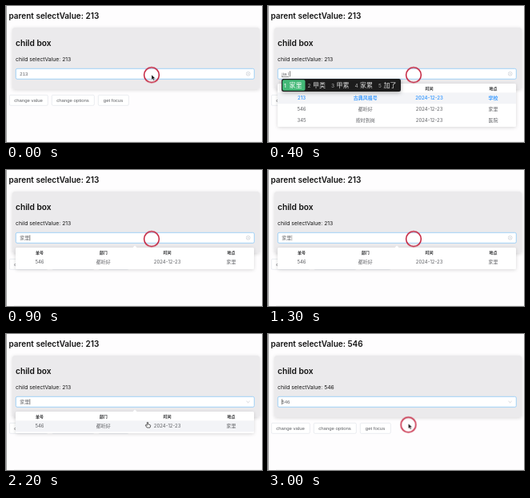
Recreate the animation shown at these times as an HTML page. Size 320 by 170 pixels, loop 3.2 s.

```html
<!DOCTYPE html>
<html lang="en">
<head>
<meta charset="utf-8">
<title>Select demo</title>
<style>
html, body { margin: 0; width: 100%; height: 100%; overflow: hidden; background: #fefdfe; }
svg { display: block; width: 100vw; height: 100vh; }
text { font-family: Inter, "Noto Sans CJK SC", "Noto Sans CJK", sans-serif; font-size: 6px; fill: #606266; }
.title { font-size: 10px; font-weight: 600; fill: #111; }
.subtitle { font-size: 10.2px; }
.label { font-size: 6.8px; fill: #151515; }
.ui { font-family: "Liberation Sans", Arial, "Noto Sans CJK SC", "Noto Sans CJK", sans-serif; }
.button rect { fill: #fff; stroke: #dcdfe6; stroke-width: .6; }
.button text, .cells text { text-anchor: middle; }
.head text { font-size: 5px; font-weight: 700; fill: #303133; }
.picked text { font-weight: 600; fill: #409eff; }
.ime text { font-size: 8px; fill: #ddd; }
.ime .key { font-size: 6.5px; fill: #aaa; }
.ime .first { fill: #fff; font-weight: 500; }

/* one loop is 32 steps of 100 ms */
.anim { animation: 3.2s step-end infinite; }
.before { animation-name: before; }
.after { animation-name: after; }
.untouched { animation-name: untouched; }
.typed1 { animation-name: typed1; }
.typed2 { animation-name: typed2; }
.typed3 { animation-name: typed3; }
.ime2 { animation-name: ime2; }
.committed { animation-name: committed; }
.all-rows { animation-name: allRows; }
.match { animation-name: match; }
.menu { animation-name: menu; transform-origin: 161px 94px; }
.caret { animation-name: caret; }
.clear { animation-name: clear; }
.chevron { animation-name: chevron; }
.hover { animation-name: hover; }
.arrow { animation-name: arrow; }
.hand { animation-name: hand; }
.ring { animation-name: ring; }

@keyframes before { 0% { opacity: 1 } 87.5%, 100% { opacity: 0 } }
@keyframes after { 0% { opacity: 0 } 87.5%, 100% { opacity: 1 } }
@keyframes untouched { 0% { opacity: 1 } 3.125%, 100% { opacity: 0 } }
@keyframes typed1 { 0% { opacity: 0 } 3.125% { opacity: 1 } 12.5%, 100% { opacity: 0 } }
@keyframes typed2 { 0% { opacity: 0 } 12.5% { opacity: 1 } 15.625%, 100% { opacity: 0 } }
@keyframes typed3 { 0% { opacity: 0 } 15.625% { opacity: 1 } 25%, 100% { opacity: 0 } }
@keyframes ime2 { 0% { opacity: 0 } 12.5% { opacity: 1 } 25%, 100% { opacity: 0 } }
@keyframes committed { 0% { opacity: 0 } 25% { opacity: 1 } 87.5%, 100% { opacity: 0 } }
@keyframes allRows { 0% { opacity: 1 } 25%, 100% { opacity: 0 } }
@keyframes match { 0% { opacity: 0 } 25%, 100% { opacity: 1 } }
@keyframes menu {
  0% { opacity: 0; transform: scaleY(0) }
  3.125% { opacity: .3; transform: scaleY(.35) }
  6.25% { opacity: .78; transform: scaleY(.82) }
  9.375% { opacity: 1; transform: scaleY(1) }
  87.5% { opacity: .7; transform: scaleY(.8) }
  90.625% { opacity: .2; transform: scaleY(.35) }
  93.75%, 100% { opacity: 0; transform: scaleY(0) }
}
@keyframes caret {
  0% { opacity: 0; transform: translateX(24px) }
  3.125% { opacity: 1; transform: translateX(23.5px) }
  12.5% { opacity: 1; transform: translateX(26.5px) }
  15.625% { opacity: 1; transform: translateX(28px) }
  25% { opacity: 1; transform: translateX(29.3px) }
  40.625% { opacity: .5; transform: translateX(29.3px) }
  43.75% { opacity: 0; transform: translateX(29.3px) }
  59.375% { opacity: 1; transform: translateX(29.3px) }
  75% { opacity: 0; transform: translateX(29.3px) }
  87.5%, 100% { opacity: 1; transform: translateX(17px) }
}
@keyframes clear { 0% { opacity: 1 } 62.5%, 100% { opacity: 0 } }
@keyframes chevron { 0% { opacity: 0 } 62.5%, 100% { opacity: 1 } }
@keyframes hover { 0% { opacity: 0 } 68.75%, 100% { opacity: 1 } }
@keyframes arrow {
  0% { opacity: 1; transform: translate(182px, 86px) }
  3.125% { opacity: 0; transform: translate(182px, 86px) }
  59.375% { opacity: 1; transform: translate(182px, 89px) }
  62.5% { opacity: 1; transform: translate(181px, 96px) }
  65.625% { opacity: 1; transform: translate(179px, 105px) }
  68.75% { opacity: 0; transform: translate(177px, 111px) }
  93.75%, 100% { opacity: 1; transform: translate(175.5px, 112px) }
}
@keyframes hand {
  0% { opacity: 0; transform: translate(177px, 111px) }
  68.75% { opacity: 1; transform: translate(177px, 110px) }
  71.875% { opacity: 1; transform: translate(176.5px, 112px) }
  75% { opacity: 1; transform: translate(176px, 112.5px) }
  93.75%, 100% { opacity: 0; transform: translate(176px, 112.5px) }
}
@keyframes ring {
  0% { opacity: 1; transform: translate(182px, 86.2px) }
  59.375% { opacity: 0; transform: translate(182px, 86.2px) }
  84.375%, 100% { opacity: 1; transform: translate(175.5px, 113.5px) }
}
</style>
</head>
<body>
<svg viewBox="0 0 320 170">
  <defs>
    <filter id="soft" x="-10%" y="-30%" width="120%" height="160%">
      <feDropShadow dx="0" dy="1" stdDeviation="2.2" flood-color="#000" flood-opacity=".15"/>
    </filter>
    <filter id="deep" x="-10%" y="-60%" width="120%" height="220%">
      <feDropShadow dx="0" dy="1.5" stdDeviation="2.5" flood-color="#000" flood-opacity=".3"/>
    </filter>
  </defs>
  <rect width=".7" height="170" fill="#777"/>
  <rect x="10" y="169" width="310" height="1" fill="#f3f3f3"/>

  <text class="title anim before" x="3.5" y="15.5">parent selectValue: 213</text>
  <text class="title anim after" x="3.5" y="15.5">parent selectValue: 546</text>

  <rect x="8" y="27" width="309" height="77" rx="2.5" fill="#ebeaec" filter="url(#soft)"/>
  <text class="title subtitle" x="12" y="50">child box</text>
  <text class="label anim before" x="12" y="69.3">child selectValue: 213</text>
  <text class="label anim after" x="12" y="69.3">child selectValue: 546</text>

  <g id="buttons"></g>

  <rect x="12.3" y="78.3" width="298" height="13" rx="1.7" fill="#fff" stroke="#8cc8f7" stroke-width=".8"/>
  <g id="values"></g>
  <rect class="anim caret" y="81.3" width=".6" height="7" fill="#333"/>
  <g class="anim clear" fill="none" stroke="#c0c4cc" stroke-width=".6">
    <circle cx="302.7" cy="84.7" r="2.4"/>
    <path d="M301.8 83.8l1.8 1.8m0-1.8l-1.8 1.8"/>
  </g>
  <path class="anim chevron" d="M300.6 83.9l2 1.9 2-1.9" fill="none" stroke="#b4b8c0" stroke-width=".6"/>

  <g class="anim menu">
    <g class="anim all-rows" id="allRows">
      <rect x="12" y="97" width="298" height="54" rx="1.7" fill="#fff" filter="url(#soft)"/>
      <rect x="12" y="108.3" width="298" height="14" fill="#f3f4f7"/>
    </g>
    <g class="anim match" id="match">
      <rect x="12" y="97" width="298" height="27" rx="1.7" fill="#fff" filter="url(#soft)"/>
      <rect class="anim hover" x="12" y="108.3" width="298" height="14" fill="#f3f4f7"/>
    </g>
    <path d="M158.4 97.2l2.7-2.8 2.7 2.8z" fill="#fff"/>
  </g>

  <g class="anim typed1 ime" id="ime1"></g>
  <g class="anim ime2 ime" id="ime2"></g>

  <circle class="anim ring" r="9.4" fill="none" stroke="#c4203c" stroke-width="1.5"/>
  <path class="anim arrow" d="M0 0v6.2l1.5-1.3 1 2.3 1.1-.5-1-2.2h2z" fill="#111" stroke="#fff" stroke-width=".4"/>
  <path class="anim hand" d="M-.7 .6Q0-.4 .7 .6V3l2.5.6q.7.3.5 1.2L3 7H-.8L-2.7 4.2q0-.9.9-.5l1.1.8z"
    fill="#fff" stroke="#222" stroke-width=".7" stroke-linejoin="round"/>
</svg>
<script>
const add = (id, markup) => document.getElementById(id).insertAdjacentHTML('beforeend', markup);
const label = (x, y, content, cls = '') => `<text class="${cls}" x="${x}" y="${y}">${content}</text>`;

for (const [x, width, name] of [[4, 48, 'change value'], [57, 53, 'change options'], [115, 38, 'get focus']])
  add('buttons', `<g class="button"><rect x="${x + .3}" y="111.3" width="${width}" height="13" rx="1.5"/>
    ${label(x + width / 2, 119.8, name, 'ui')}</g>`);

const values = { untouched: '213', typed1: 'jia', typed2: 'jia l', typed3: 'jia li', committed: '家里', after: '546' };
const underline = { typed1: 6.3, typed2: 9.3, typed3: 11 };
for (const [cls, value] of Object.entries(values)) {
  const line = underline[cls] ? `<rect x="17" y="88.2" width="${underline[cls]}" height=".6" fill="#555"/>` : '';
  add('values', `<g class="anim ${cls}">${label(17.3, 87, value, 'ui')}${line}</g>`);
}

const row = (y, cells, cls = '') =>
  `<g class="cells ${cls}">${cells.map((cell, i) => label(42 + i * 79.8, y, cell)).join('')}</g>`;
const head = row(105.3, ['单号', '部门', '时间', '地点'], 'head');
const date = '2024-12-23';
const home = ['546', '都听好', date, '家里'];
add('allRows', head + row(117.1, ['213', '古典风格号', date, '学校'], 'picked')
  + row(131.1, home) + row(145.1, ['345', '按时到岗', date, '医院']));
add('match', head + row(117.1, home));

const house = x => `<path d="M${x} 98.5l4-4 4 4-1 .5v4h-6v-4z" fill="#d8d0c4"/>
  <path d="M${x} 98.5l4-4 4 4" fill="none" stroke="#b9504a" stroke-width="1.2"/>
  <rect x="${x + 3}" y="99.7" width="2" height="3.3" fill="#8a5a3c"/>`;
const plus = x => `<path d="M${x + 4} 95.5v6.4m-3.2-3.2h6.4" stroke="#777" stroke-width="1.5"/>`;
const shapes = { house, plus };

function inputMethod(id, width, first, pitch, shadow, words) {
  add(id, `<rect x="17" y="91" width="${width}" height="16" rx="2.5" fill="#1c1c1e" filter="url(#${shadow})"/>
    <rect x="18" y="92.3" width="${first}" height="13.4" rx="2" fill="#43b977"/>`);
  words.forEach((word, i) => {
    const x = 20 + i * pitch, cls = i ? '' : 'first';
    add(id, label(x, 101.5, i + 1, 'key ' + cls)
      + (shapes[word] ? shapes[word](x + 6.5) : label(x + 6.5, 101.9, word, cls)));
  });
}
inputMethod('ime1', 111, 21, 21.7, 'soft', ['加', 'plus', '家', 'house', '佳']);
inputMethod('ime2', 149, 28.5, 29.5, 'deep', ['家里', '甲类', '甲累', '家累', '加了']);
</script>
</body>
</html>
```
